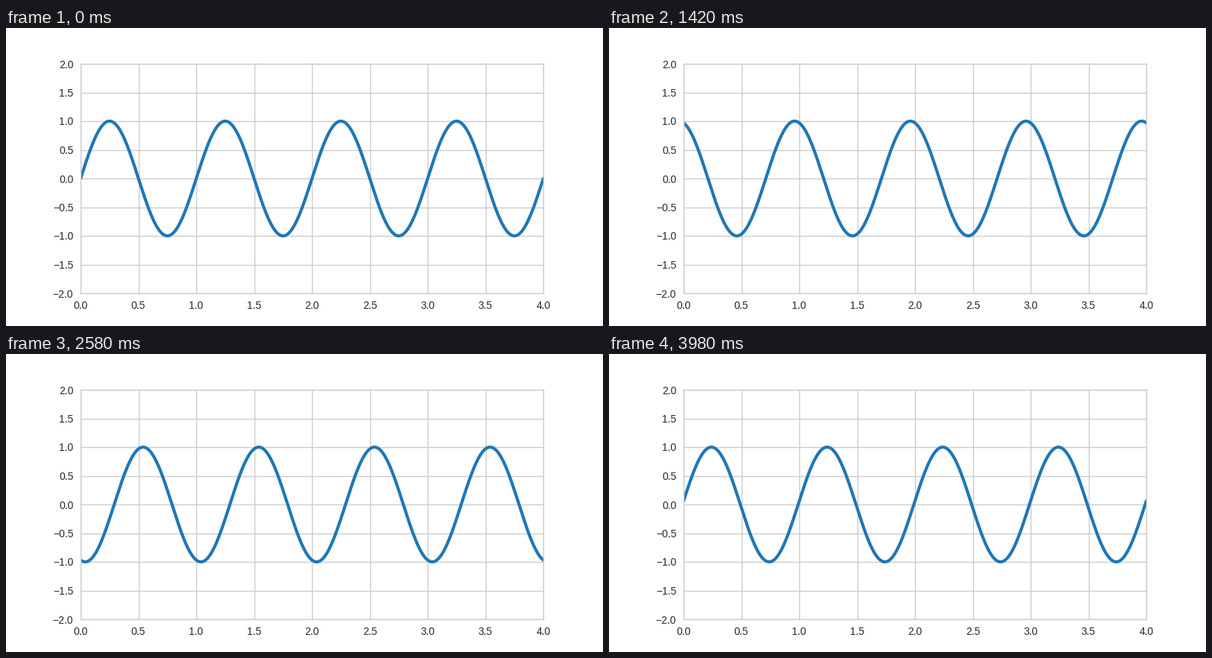
These frames come from a looping animation (800x400 px, 4000 ms). A matplotlib script:

```python
import matplotlib.pyplot as plt
import numpy as np
from matplotlib.animation import FuncAnimation

FRAMES = 200
INTERVAL = 20  # ms
SPEED = 0.01   # shift of the wave per frame, in x units

plt.rcParams.update({
    "font.family": "Liberation Sans",
    "font.size": 10,
    "axes.axisbelow": True,
    "axes.edgecolor": "0.8",
    "axes.linewidth": 1,
    "grid.color": "0.8",
    "grid.linewidth": 1,
})

fig = plt.figure(figsize=(8, 4), dpi=100, facecolor="white")
ax = fig.add_axes([0.125, 0.11, 0.775, 0.77])
ax.set(xlim=(0, 4), ylim=(-2, 2),
       xticks=np.arange(0, 4.1, 0.5), yticks=np.arange(-2, 2.1, 0.5))
ax.grid(True, linestyle="-")
ax.tick_params(length=0, pad=7, labelcolor="0.15")

x = np.linspace(0, 4, 1000)
line, = ax.plot([], [], color="#1f77b4", lw=3, solid_capstyle="round")


def update(i):
    line.set_data(x, np.sin(2 * np.pi * (x - SPEED * i)))
    return line,


anim = FuncAnimation(fig, update, frames=FRAMES, interval=INTERVAL,
                     init_func=lambda: update(0), repeat=True, repeat_delay=0)
plt.show()
```
